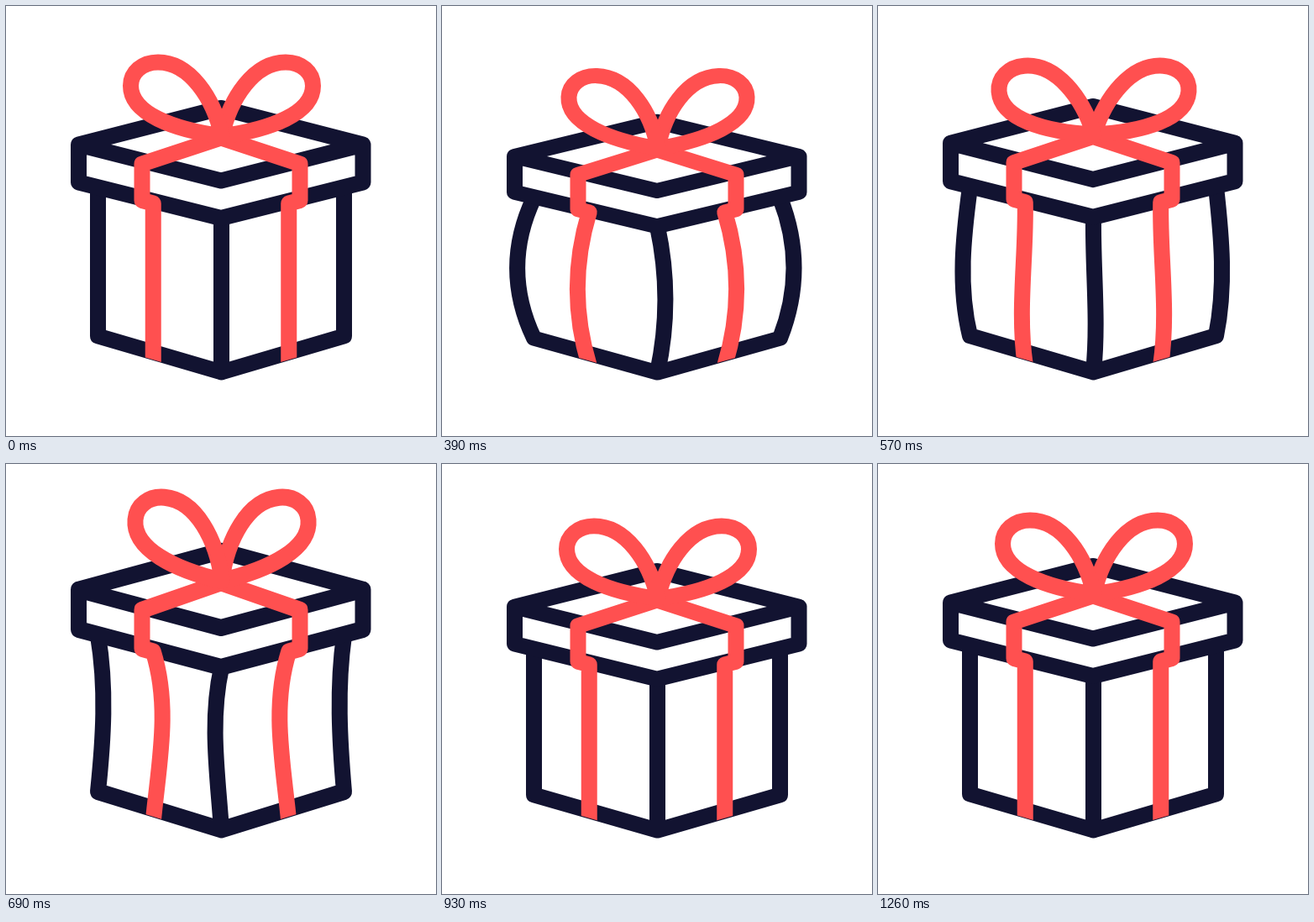
These frames come from a looping animation (512 px wide and 512 px high, 1320 ms). An HTML page with a canvas:

```html
<!DOCTYPE html>
<html lang="en">
<head>
<meta charset="utf-8">
<title>Gift box</title>
<style>
  html, body { margin: 0; width: 100%; height: 100%; overflow: hidden; background: #fff; }
  canvas { display: block; width: 512px; height: 512px; }
</style>
</head>
<body>
<canvas id="stage" width="512" height="512"></canvas>
<script>
const ctx = document.getElementById('stage').getContext('2d');
const NAVY = '#121331', RED = '#ff5050';
const LOOP = 1320, STEP = 30, END = 1260;
const AXIS = 256, FLOOR = 446, KNOT = { x: 257, y: 155 };

const ease = p => (1 - Math.cos(Math.PI * p)) / 2;

// Sine-eased swing between [time, value] poses; the last pose holds.
function swing(t, ...poses) {
  const next = poses.findIndex(([time]) => time > t);
  if (next < 0) return poses.at(-1)[1];
  const [t0, v0] = poses[next - 1], [t1, v1] = poses[next];
  return v0 + (v1 - v0) * ease((t - t0) / (t1 - t0));
}

const stretch = t => 1 + swing(t, [0, 0], [390, -0.05], [420, -0.05], [710, 0.056],
  [930, -0.018], [1110, 0.005], [END, 0]);

const bowTilt = t => swing(t, [0, 0], [180, 0.075], [390, 0.04], [570, -0.08],
  [690, 0.085], [930, 0]);

// Walls puff out, get sucked in by `recoil`, then straighten.
const puff = (t, recoil, lag) =>
  swing(t, [0, 0], [240, 0.9], [390, 1], [440 + lag, 1], [700 + lag, -recoil], [930, 0]);

// The lower handle trails the upper one.
const bend = (t, size, recoilUpper, recoilLower) =>
  [size * puff(t, recoilUpper, 0), size * puff(t, recoilLower, 25)];

function stroke(color, build) {
  ctx.strokeStyle = color;
  ctx.beginPath();
  build();
  ctx.stroke();
}

function polyline(...points) {
  points.forEach(([x, y], i) => i ? ctx.lineTo(x, y) : ctx.moveTo(x, y));
}

// Vertical edge at x, bowed sideways by its two handles.
function edge(x, top, bottom, [upper, lower], scale) {
  const third = (bottom - top) / 3;
  ctx.bezierCurveTo(x + upper * scale, top + third, x + lower * scale, bottom - third, x, bottom);
}

function drawBody(sideBend, innerBend) {
  const middle = AXIS + 0.5;
  stroke(NAVY, () => {
    for (const side of [-1, 1]) {
      const x = AXIS + 146.5 * side;
      ctx.moveTo(x, 217);
      edge(x, 217, 393, sideBend, side < 0 ? -1 : 0.83);
      ctx.lineTo(middle, 436);
    }
    ctx.moveTo(middle, 253);
    edge(middle, 253, 436, innerBend, 0.68);
  });
}

function drawLid() {
  const left = 86.5, right = 425;
  stroke(NAVY, () => {
    polyline([left, 165], [AXIS, 121.5], [right, 165], [AXIS, 208]);
    ctx.closePath();
    polyline([left, 165], [left, 210], [AXIS, 252.5], [right, 210], [right, 165]);
  });
}

function drawRibbon(innerBend) {
  ctx.save();
  ctx.beginPath();
  polyline([0, 0], [512, 0], [512, 370], [AXIS, 444.8], [0, 370]);
  ctx.clip();
  stroke(RED, () => {
    for (const side of [-1, 1]) {
      const outer = AXIS + 94 * side, x = AXIS + 80.75 * side;
      polyline([AXIS, 157], [outer, 188], [outer, 231.5], [x, 235]);
      edge(x, 235, 427, innerBend, side);
    }
  });
  ctx.restore();
}

function drawBow(tilt) {
  for (const side of [1, -1]) {
    ctx.save();
    ctx.translate(KNOT.x, KNOT.y);
    ctx.scale(side, 1);
    ctx.rotate(-tilt);
    stroke(RED, () => {
      ctx.moveTo(0, -1);
      ctx.bezierCurveTo(10, -45, 38, -88, 76, -88);
      ctx.bezierCurveTo(95, -88, 108.5, -76, 108.5, -60);
      ctx.bezierCurveTo(108.5, -27, 58, -8, 0, 0);
    });
    ctx.restore();
  }
}

function draw(t) {
  const sideBend = bend(t, 26.5, 0.4, 0.3);
  const innerBend = bend(t, 18.5, 1.15, 0.4);
  ctx.setTransform(1, 0, 0, 1, 0, 0);
  ctx.fillStyle = '#fff';
  ctx.fillRect(0, 0, 512, 512);
  ctx.lineWidth = 19;
  ctx.lineCap = ctx.lineJoin = 'round';
  ctx.translate(0, FLOOR);
  ctx.scale(1, stretch(t));
  ctx.translate(0, -FLOOR);
  drawBody(sideBend, innerBend);
  drawLid();
  drawRibbon(innerBend);
  drawBow(bowTilt(t));
}

const start = performance.now();
function tick() {
  const time = (performance.now() - start) % LOOP;
  draw(Math.min(END, Math.floor(time / STEP) * STEP));
  requestAnimationFrame(tick);
}
tick();
</script>
</body>
</html>
```
